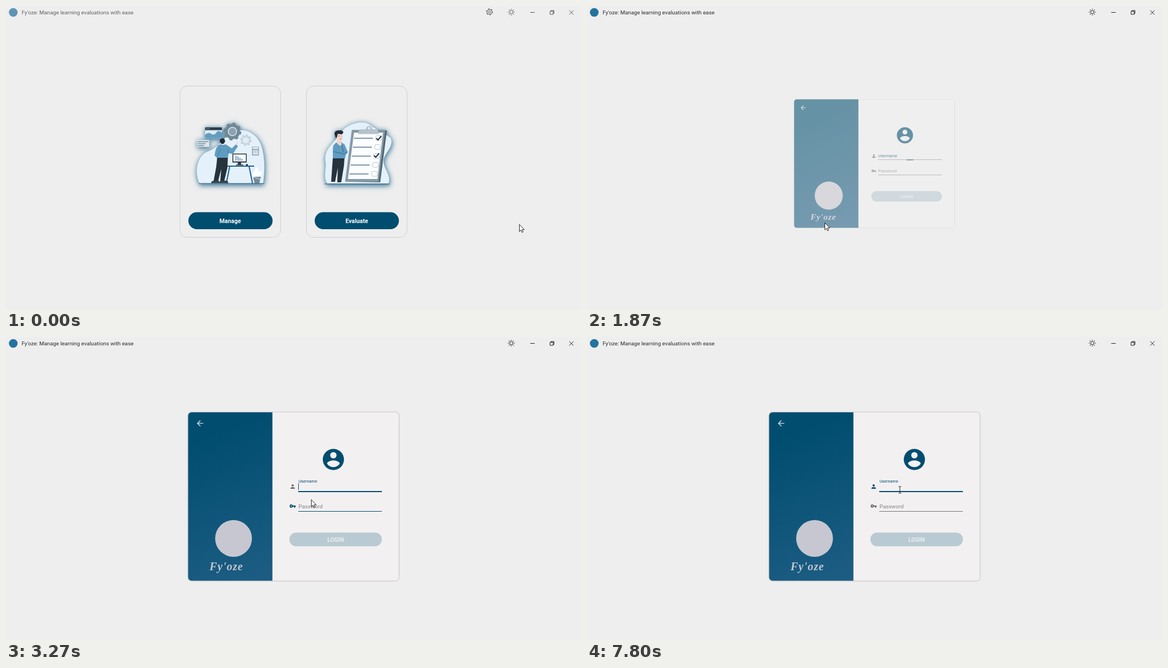
Write an HTML page that moves like this. It is 1031 px wide and 543 px high and loops after 8000 ms.

```html
<!DOCTYPE html>
<html lang="en">
<head>
<meta charset="utf-8">
<title>Sign-in walkthrough</title>
<style>
html, body { margin: 0; width: 100%; height: 100%; overflow: hidden; background: #eee; }
svg { display: block; width: 100vw; height: 100vh; font: 9.8px Roboto, sans-serif; }
.line { fill: none; stroke: #222; stroke-width: 1; }
.art { filter: drop-shadow(1px 3px 4px #1f6387aa) drop-shadow(0 0 4px #5e93b0aa); }
.btn { font-size: 10.6px; font-weight: 700; fill: #fff; text-anchor: middle; }
.lift { filter: drop-shadow(0 1.5px 2px #0008); }
.flat { filter: drop-shadow(0 .8px .8px #0006); }
</style>
</head>
<body>
<svg viewBox="0 0 1031 543">
<defs>
  <linearGradient id="panel" x1=".4" y1="0" x2=".6" y2="1">
    <stop offset=".1" stop-color="#004d70"/><stop offset="1" stop-color="#1c5c82"/>
  </linearGradient>
</defs>
<rect width="1031" height="543" fill="#eee"/>

<g id="bar">
  <circle cx="13" cy="11.5" r="7.8" fill="#23739f"/>
  <text x="28" y="15" fill="#2c2c2c">Fy'oze: Manage learning evaluations with ease</text>
  <g class="line">
    <g id="settings">
      <circle cx="867" cy="10.5" r="4.4"/>
      <circle cx="867" cy="10.5" r="5.3" stroke-width="1.4" pathLength="12" stroke-dasharray="1"/>
      <circle cx="867" cy="10.5" r="1.9"/>
    </g>
    <circle cx="906" cy="11" r="3"/>
    <circle cx="906" cy="11" r="5.3" stroke-width="1.5" pathLength="16" stroke-dasharray=".6 1.4" stroke-dashoffset=".3"/>
    <path d="M940 11.5h8M975.5 9.5h5.5v5.5h-5.5zM977 9.5v-1.5h5.5v5.5h-1.5M1010 7.8l7.6 7.6m0-7.6l-7.6 7.6"/>
  </g>
</g>

<g id="home">
  <g fill="none" stroke="#cfcfcf">
    <rect x="312" y="143.5" width="180.5" height="271" rx="13"/>
    <rect x="538.5" y="143.5" width="180.5" height="271" rx="13"/>
  </g>
  <rect id="hover" class="lift" x="311.5" y="143" width="181.5" height="272" rx="13" fill="#f3f0f1"/>
  <g fill="#004d70">
    <rect x="327" y="369.5" width="151" height="30.5" rx="15.2"/>
    <rect x="553.5" y="369.5" width="151" height="30.5" rx="15.2"/>
  </g>
  <text class="btn" x="402" y="388.5">Manage</text>
  <text class="btn" x="629" y="388.5">Evaluate</text>

  <!-- worker at a desk -->
  <g class="art">
    <path fill="#e4f1fb" d="M347 318C338 300 341 272 359 262C374 256 381 250 393 236C410 217 440 217 455 244C464 262 465 292 461 318Z"/>
    <path fill="#dce9f3" d="M357 218h30v18.5h-30z"/>
    <path fill="#629dbf" d="M357 231q6-6 11-2t9-2 10 0v9.5h-30z"/>
    <path fill="#2a3b49" d="M357 217.5h30v5h-30z"/>
    <path stroke="#dce9f3" stroke-width="1.2" stroke-dasharray="1.2 1.2" d="M359 220h7"/>
    <path fill="#dfe5e9" d="M343 240h21.5v12.5h-21.5z"/>
    <path stroke="#8fa3b0" stroke-width="2" d="M344 243h19M344 246.5h14M344 250h11"/>
    <g fill="none">
      <circle cx="406" cy="225" r="10.5" stroke="#718895" stroke-width="6.5"/>
      <circle cx="406" cy="225" r="14" stroke="#718895" stroke-width="4" pathLength="16" stroke-dasharray="1"/>
      <circle cx="406" cy="225" r="7.5" fill="#8ca2ae" stroke="#dce6ec" stroke-width="1.5"/>
      <circle cx="430" cy="240.5" r="7" stroke="#c8d3da" stroke-width="3"/>
      <circle cx="430" cy="240.5" r="9.3" stroke="#c8d3da" stroke-width="2.5" pathLength="16" stroke-dasharray="1"/>
      <circle cx="430" cy="240.5" r="3.5" stroke="#d3dce2"/>
    </g>
    <path fill="#9badb8" d="M441 252h12.5v16h-12.5z"/>
    <path fill="#e8eff4" d="M442.5 253h9.5v3h-9.5zM443 258.5h8.5v7.5h-8.5z"/>
    <path stroke="#9badb8" d="M444 260.5h6m-6 2.5h6"/>
    <path fill="none" stroke="#205f91" stroke-width="2" d="M395 287H445M401 288L395 318M436 288L442 318"/>
    <path fill="#283743" d="M406 264.5h25.5v16h-25.5zM415.5 280h6v4h4v1.5h-13v-1.5h3zM430 286q0-3 2-3t2 3z"/>
    <path fill="#fff" d="M407.5 266h22.5v12.5h-22.5z"/>
    <path stroke="#6c9bb8" stroke-width="2" d="M412.5 277v-9m3.5 9v-7m3.5 7v-5m3.5 5v-3"/>
    <path fill="#fff" d="M443 306q-3-8 3-9 0-6 4-9 4 5 2 10 6-4 7 0 0 5-6 8z"/>
    <path fill="#748b98" d="M443 306h14l-3 12.5h-8z"/>
    <path stroke="#dfe8ee" d="M443 306l13 5"/>
    <path fill="#26323c" d="M379 268l19 0-1 22-6 25h-7l2-23-6 23h-8l5-27z"/>
    <path fill="#33454f" d="M368 315l4-2h10v4.5h-14zM382 315l5-2h10l2 4.5h-17z"/>
    <path fill="#609cc0" d="M384 248q-8 2-10 20l4 4h20l1-8 8 1 9-14-4-3-7 7-11-7z"/>
    <path stroke="#407ba3" fill="none" d="M379 269l6-13M398 264v-7"/>
    <path fill="#f1d7ca" d="M412 248l2-4 2 0-1 6zM387 240h5v9h-5z"/>
    <path fill="#202c36" d="M384 239q5-4 8 0l1 4-3 4h-4q-4-4-2-8z"/>
    <path stroke="#34607c" stroke-width="1.2" d="M346 318H463"/>
  </g>

  <!-- thinker beside a checklist -->
  <g class="art">
    <path fill="#e4f1fb" d="M576 318C568 306 575 292 573 280C569 256 588 247 598 230C609 211 638 204 651 212C662 221 682 229 690 237C696 254 677 264 677 278C677 293 691 302 686 318Z"/>
    <path fill="#4f6674" d="M622 223h61l-12 93-62-1z"/>
    <path fill="#8599a5" d="M620 222h60l-12 93h-60z"/>
    <path fill="#fcfdfe" d="M624 227h52l-10 83h-53z"/>
    <path fill="#b5c2cb" d="M634 221h11q1-6 6-6t6 6h9l3 8.5h-38z"/>
    <circle cx="651" cy="219" r="2" fill="#e4f1fb"/>
    <path fill="none" stroke="#577b90" stroke-width="1.6" d="M624 237h34M622 253h34M620 269h34M618 285h34M616 301h34"/>
    <g id="boxes" fill="#fff" stroke="#b9c3ca"></g>
    <path fill="none" stroke="#1c2c3e" stroke-width="2" d="M664 237l3 3 6-7M660 268l3 3 6-7"/>
    <path fill="#26323c" d="M586 272h21l-1 14-5 30h-7l1-26-5 25h-7z"/>
    <path fill="#609cc0" d="M592 245q-6 3-6 12v16h22l1-6 4-5-6-14-6-4z"/>
    <path fill="none" stroke="#36698c" d="M587 261l19 4 5-3M605 262l-3-14"/>
    <path fill="#f1d7ca" d="M592 229h11l1 9-4 6 2 3-2 4-6-4z"/>
    <path fill="none" stroke="#34495a" stroke-width=".8" d="M596 233h2m3 0h1m-3 5h2"/>
    <path fill="#202c36" d="M589 229q0-6 7-6 8-1 9 4l-3 3-7-1-2 7-2 0z"/>
    <path stroke="#34607c" stroke-width="1.2" d="M571 319H688"/>
  </g>
</g>

<g id="login">
  <rect class="flat" x="326.6" y="135" width="377.6" height="301.7" rx="6" fill="#f3f0f1"/>
  <path fill="url(#panel)" d="M477.7 135v301.7H332.6a6 6 0 0 1-6-6V141a6 6 0 0 1 6-6z"/>
  <path fill="#d2dce3" transform="translate(339.3 146) scale(.72)" d="M20 11V13H8L13.5 18.5 12.08 19.92 4.16 12 12.08 4.08 13.5 5.5 8 11H20Z"/>
  <circle cx="408" cy="361" r="33" fill="#c6c7d0"/>
  <text x="365" y="418" fill="#c6c7d0" style="font:italic bold 20px 'Liberation Serif',serif;letter-spacing:1px">Fy'oze</text>
  <circle cx="587" cy="219.5" r="19" fill="#004d70"/>
  <g fill="#f3f0f1">
    <circle cx="587" cy="211.9" r="5.7"/>
    <path d="M575.6 227.1c0-4 7.6-5.9 11.4-5.9s11.4 1.9 11.4 5.9a13.7 13.7 0 0 1-22.8 0z"/>
  </g>
  <path id="user" transform="translate(508 262) scale(.5)" d="M12 4a4 4 0 1 1 0 8 4 4 0 0 1 0-8m0 10c4.42 0 8 1.79 8 4v2H4v-2c0-2.21 3.58-4 8-4Z"/>
  <path id="key" transform="translate(508 297) scale(.5)" fill-rule="evenodd" d="M7 14a2 2 0 1 1 0-4 2 2 0 0 1 0 4M12.65 10C11.83 7.67 9.61 6 7 6a6 6 0 0 0 0 12c2.61 0 4.83-1.67 5.65-4H17v4h4v-4h2v-4z"/>
  <path stroke="#777" d="M524 276.5H674"/>
  <path id="focus" stroke="#004d70" stroke-width="2"/>
  <path id="passLine" d="M524 312.5H674"/>
  <text id="label" fill="#004d70">Username</text>
  <text x="524.5" y="306.5" fill="#858384">Password</text>
  <path id="caret" stroke="#004d70" d="M524.5 262v12"/>
  <rect x="508" y="350.5" width="166" height="24.5" rx="12.2" fill="#b9cad2"/>
  <text class="btn" x="591" y="366.5" style="font-size:10.3px;fill:#eceff1">LOGIN</text>
</g>

<g id="cursor" stroke-linejoin="round">
  <path id="arrow" fill="#fff" stroke="#111" stroke-width=".9" d="M.5.5V13.2L3.4 10.4 5.3 14.8 7.3 14 5.4 9.7H9.3Z"/>
  <path id="hand" fill="#fff" stroke="#111" stroke-width=".9" d="M.5 10.5V2q0-1.5 1.3-1.5T3.1 2v4.5q1.2-1 2.2.3 1.3-.7 2.2.6 1.5-.4 1.7 1.2v4.2l-1.4 4.4H1.5L-2.8 11q-1.2-1.8.2-2.2 1-.2 1.8.8z"/>
  <path id="beam" fill="none" stroke="#222" d="M-2.5-6H-.5L0-5.5.5-6H2.5M0-5.5V5.5M-2.5 6H-.5L0 5.5.5 6H2.5"/>
</g>
</svg>
<script>
const $ = id => document.getElementById(id);
const set = (id, attrs) => { for (const k in attrs) $(id).setAttribute(k, attrs[k]); };
const show = (id, on) => set(id, { opacity: +on });
const span = (t, a, b) => Math.min(1, Math.max(0, (t - a) / (b - a)));
const out = (p, n = 3) => 1 - (1 - p) ** n;
const smooth = p => p * p * (3 - 2 * p);
const bezier = (p, a, b, c) => (1 - p) ** 2 * a + 2 * p * (1 - p) * b + p * p * c;

const LOOP = 8000, CLICK = 1670;
const BLUE = '#004d70', GREY = '#6d6b6c';
const BLINKS = [2500, 3000, 3530, 4070, 4600, 5070, 5630, 6170, 6730, 7200, 7800];

$('boxes').innerHTML = [0, 1, 2, 3, 4].map(i =>
  `<rect x="${663 - 1.8 * i}" y="${232.5 + 16 * i}" width="10" height="8.5" rx="2"/>`).join('');

function pointer(t) {
  if (t < 2700) {
    const p = smooth(span(t, 370, 1200));
    return [bezier(p, 920, 673, 426), bezier(p, 391, 510, 388)];
  }
  const p = out(span(t, 2700, 3560), 2);
  return [bezier(p, 426, 500, 561), bezier(p, 388, 352, 274)];
}

function draw(t) {
  const [x, y] = pointer(t);
  show('settings', t < CLICK);
  set('bar', { opacity: t < CLICK ? .72 : 1 });
  set('home', { opacity: 1 - span(t, CLICK, 1790) });
  set('hover', { opacity: span(t, 1040, 1220) });

  const enter = out(span(t, 1800, 2090));
  set('login', {
    opacity: enter,
    transform: `translate(515.5 271.5) scale(${.45 + .55 * enter}) translate(-515.5 -271.5)`
  });
  const half = 75 * out(span(t, 1860, 2160));
  set('focus', { d: `M${599 - half} 277H${599 + half}` });
  const lift = out(span(t, 1920, 2200));
  set('label', { transform: `translate(524.5 ${270.5 - 9.8 * lift}) scale(${1 - .25 * lift})` });
  show('caret', t > 1900 && BLINKS.filter(b => b <= t).length % 2 === 0);

  const inField = t > 2700 && x > 509;
  const onUser = inField && y < 284;
  const onPass = inField && !onUser && y < 315;
  set('user', { fill: onUser ? BLUE : GREY });
  set('key', { fill: onPass ? BLUE : GREY });
  set('passLine', { stroke: onPass ? BLUE : '#777' });

  const hand = t > 1040 && t < 1760;
  set('cursor', { transform: `translate(${Math.round(x)} ${Math.round(y)})` });
  show('hand', hand);
  show('beam', onUser);
  show('arrow', !hand && !onUser);
}

const start = performance.now();
(function tick() {
  draw((performance.now() - start) % LOOP);
  requestAnimationFrame(tick);
})();
</script>
</body>
</html>
```
